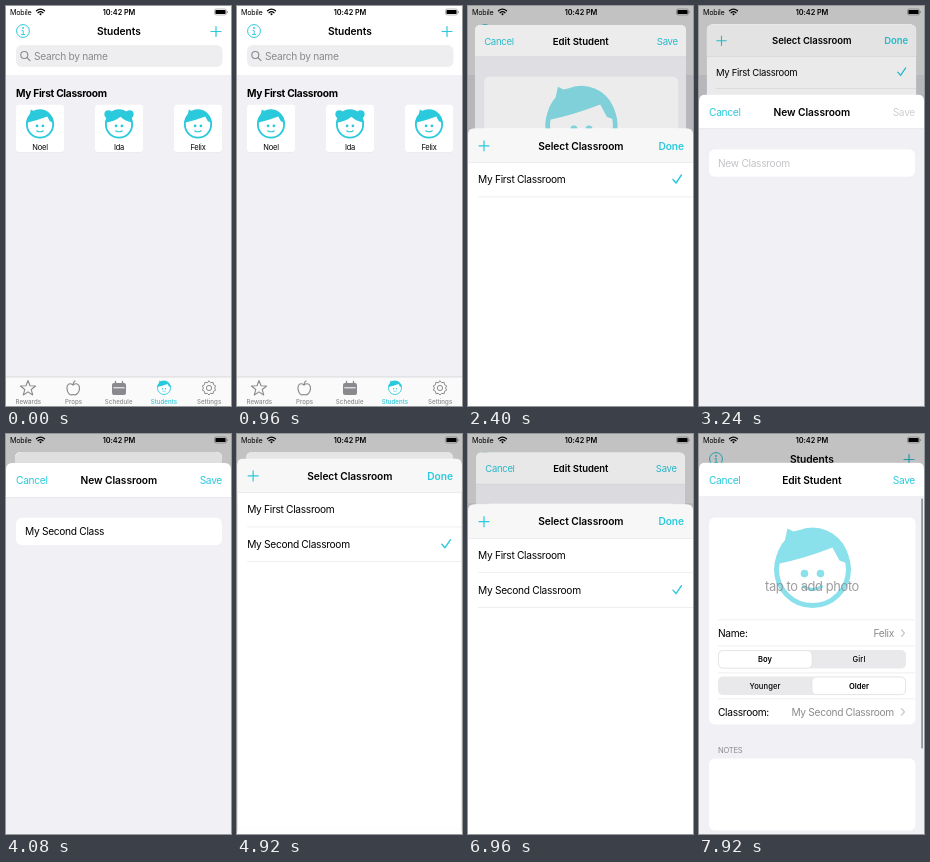
Recreate the animation shown at these times as an HTML page. Size 225x400 px, loop 8000 ms.

```html
<!DOCTYPE html>
<html lang="en">
<head>
<meta charset="utf-8">
<title>Classroom app</title>
<style>
  html, body { margin: 0; height: 100%; overflow: hidden; }
  svg { display: block; width: 100%; height: 100%; }
  text { font-family: Inter, "Liberation Sans", sans-serif; letter-spacing: -.03em; white-space: pre; }
  text[font-weight="600"] { letter-spacing: -.005em; }
  text[font-weight="500"] { letter-spacing: .01em; }
</style>
</head>
<body>
<svg id="stage" viewBox="0 0 225 400"></svg>
<script>
const LOOP = 8000, TOP = 29, SHEET_H = 371, TALL = 400;
const CYAN = '#2bc9dc', GRAY = '#8a8a8e', PAGE = '#f0f0f5', LINE = '#e3e3e6';
const EDIT_IN = 1458, SELECT_IN = 2254, NEW_IN = 3061, NEW_OUT = 4595, SELECT_OUT = 6930;
const TYPE_START = 3480, TYPE_STEP = 38, NEW_NAME = 'My Second Classroom';

// Markup helpers; text is placed by its vertical centre.
const text = (x, y, s, { size = 10.2, fill = '#000', weight = 400, anchor = 'start', id = '', extra = '' } = {}) =>
  `<text ${id && `id="${id}"`} x="${x}" y="${y}" dy=".36em" font-size="${size}" fill="${fill}" font-weight="${weight}" text-anchor="${anchor}" ${extra}>${s}</text>`;
const rect = (x, y, w, h, fill, r = 0, extra = '') =>
  `<rect x="${x}" y="${y}" width="${w}" height="${h}" rx="${r}" fill="${fill}" ${extra}/>`;
const stroke = (d, color = CYAN, width = 1, extra = '') =>
  `<path d="${d}" fill="none" stroke="${color}" stroke-width="${width}" stroke-linecap="round" stroke-linejoin="round" ${extra}/>`;
const hline = (y, x = 0, end = 225) => rect(x, y, end - x, .6, LINE);
const title = (y, s) => text(112.8, y, s, { weight: 600, anchor: 'middle' });
const plus = (x, y) => stroke(`M${x - 5} ${y}h10M${x} ${y - 5}v10`, CYAN, 1.2);
const check = (y, id) => stroke(`M205 ${y}l3 3.5l5.5 -8`, CYAN, 1.4, `id="${id}"`);
const chevron = y => stroke(`M202.5 ${y - 3.2}l3 3.2l-3 3.2`, '#c0c0c4', 1.1);

function face(x, y, scale, girl, extra = '') {
  const hair = girl
    ? '<circle cx="-29" cy="-28" r="11"/><circle cx="29" cy="-28" r="11"/><path d="M-37 -5A37 37 0 0 1 37 -5Q14 -10 4 -21Q-10 -9 -37 -5Z"/>'
    : '<path d="M-37 -5A37 37 0 0 1 37 -5L27 -9L20 -22Q-8 -11 -37 -5ZM-29 -23L-25 -41L-19 -38L-11 -40L-8 -34Z"/>';
  return `<g transform="translate(${x} ${y}) scale(${scale})" fill="${CYAN}" ${extra}>
    <circle r="36" fill="#fff" stroke="${CYAN}" stroke-width="5"/>${hair}
    <circle cx="-8" cy="4" r="3.8"/><circle cx="8" cy="4" r="3.8"/>
    ${stroke('M-9 17Q0 23 9 17', CYAN, 3)}</g>`;
}

const studentCard = (x, name, girl) =>
  rect(x, 99, 48, 47.5, '#000', 3, 'opacity=".04"') + rect(x, 98.7, 48, 47.3, '#fff', 3) +
  face(x + 24, 118.5, .365, girl) + text(x + 24, 141, name, { size: 7.5, anchor: 'middle' });

// A closed outline whose radius alternates around the centre: star or cog.
const burst = (x, y, points, outer, inner) => 'M' + Array.from({ length: points * 2 }, (_, i) => {
  const a = -Math.PI / 2 + i * Math.PI / points, r = i % 2 ? inner : outer;
  return `${(x + r * Math.cos(a)).toFixed(2)} ${(y + r * Math.sin(a)).toFixed(2)}`;
}).join('L') + 'Z';

function tabBar() {
  const icons =
    stroke(burst(22, 382.5, 5, 8, 3.4), GRAY, 1.1) +
    stroke('M67 379C63 376 60.5 379 61 383C61.5 387 64 390 67 388.5C70 390 73 387 73.5 383C74 379 71 376 67 379Q67 376 69 375', GRAY, 1.2) +
    rect(106, 377, 14, 12, GRAY, 2) + rect(107.3, 381.3, 11.4, 1, '#fff') +
    stroke('M109.5 375.5v3M116.5 375.5v3', GRAY, 1.4) +
    face(158, 382, .18, false) +
    stroke(burst(203, 382, 10, 7, 5.6), GRAY, 1) + `<circle cx="203" cy="382" r="2.6" fill="none" stroke="${GRAY}"/>`;
  const labels = ['Rewards', 'Props', 'Schedule', 'Students', 'Settings'].map((s, i) =>
    text(22.3 + 45.2 * i, 395.5, s, { size: 6.1, weight: 500, anchor: 'middle', fill: i === 3 ? CYAN : GRAY }));
  return rect(0, 371, 225, 29, '#fafafa') + rect(0, 370.7, 225, .6, '#c8c8cb') + icons + labels.join('');
}

const home = () =>
  rect(0, 0, 225, 400, PAGE) + rect(0, 0, 225, 69, '#fff') +
  `<circle cx="17" cy="25" r="6.4" fill="none" stroke="${CYAN}"/><circle cx="17" cy="22" r=".9" fill="${CYAN}"/>` +
  stroke('M16 24.5h1.2v4M15.5 28.5h3.2', CYAN, .9) +
  title(25.3, 'Students') + plus(210, 25.5) +
  rect(10, 39, 206.5, 22, '#eeeef0', 6) +
  `<circle cx="18.3" cy="49" r="3.5" fill="none" stroke="${GRAY}" stroke-width="1.1"/>` + stroke('M21 51.7l3 3', GRAY, 1.2) +
  text(28, 50, 'Search by name', { fill: GRAY }) +
  text(10, 87.5, 'My First Classroom', { weight: 700 }) +
  studentCard(10, 'Noel') + studentCard(89, 'Ida', true) + studentCard(168, 'Felix') + tabBar();

const statusBar = () =>
  text(4, 6.2, 'Mobile', { size: 7.2 }) +
  stroke('M30.5 4.8Q34.5 1.5 38.5 4.8M32 6.7Q34.5 4.7 37 6.7', '#000', 1.3) + '<circle cx="34.5" cy="8.3" r="1"/>' +
  text(113, 6.2, '10:42 PM', { size: 7.3, weight: 600, anchor: 'middle' }) +
  rect(208.5, 3, 12, 6, 'none', 1.6, 'stroke="#000" stroke-width=".5" stroke-opacity=".5"') +
  rect(209.4, 3.9, 10.2, 4.2, '#000', .9) + rect(221, 5, .9, 2, '#777', .4);

const header = (left, name, right, fill) =>
  rect(0, 0, 225, 34, fill) + hline(34) + left + title(17.6, name) + right;
const button = (s, x, anchor, opts) => text(x, 17.6, s, { fill: CYAN, anchor, ...opts });

const segmented = (y, left, right, selected) =>
  rect(19, y, 188, 18.5, '#e9e9eb', 5) +
  rect(19.5 + 93.5 * selected, y + .5, 93.5, 17.5, '#fff', 4.5, 'stroke="#d8d8db" stroke-width=".5"') +
  [left, right].map((s, i) => text(66 + 94 * i, y + 9.3, s, { size: 7.6, weight: i === selected ? 600 : 500, anchor: 'middle' })).join('');

const editSheet = () =>
  rect(0, 0, 225, TALL, PAGE) +
  header(button('Cancel', 10), 'Edit Student', button('Save', 216, 'end'), '#fff') +
  rect(10, 55, 206.5, 207, '#fff', 6) + face(113.5, 107, 1, false, 'opacity=".55"') +
  text(113, 124, 'tap to add photo', { size: 12.9, fill: '#8c8c90', anchor: 'middle', extra: 'opacity=".85"' }) +
  [157, 183, 210, 236].map(y => hline(y, 19, 216)).join('') +
  text(19, 170.5, 'Name:') + text(195, 170.5, 'Felix', { fill: GRAY, anchor: 'end' }) + chevron(170.5) +
  segmented(187.5, 'Boy', 'Girl', 0) + segmented(214, 'Younger', 'Older', 1) +
  text(19, 249.3, 'Classroom:') + text(195, 249.3, '', { fill: GRAY, anchor: 'end', id: 'classroom' }) + chevron(249.3) +
  text(19, 287.3, 'NOTES', { size: 7.6, fill: GRAY }) + rect(10, 296, 206.5, 72, '#fff', 6) +
  rect(222.2, 36, 1.8, 250, '#96969b', .9, 'id="scrollbar"');

const selectSheet = () =>
  rect(0, 0, 225, TALL, '#fff') +
  header(plus(16, 17.5), 'Select Classroom', button('Done', 216, 'end', { weight: 600 }), '#f7f7f7') +
  text(10, 51.2, 'My First Classroom') + check(51.2, 'check1') + hline(68.3, 10) +
  `<g id="secondRow">${text(10, 86, NEW_NAME)}${check(86, 'check2')}${hline(103, 10)}</g>`;

const newSheet = () =>
  rect(0, 0, 225, TALL, PAGE) +
  header(button('Cancel', 10), 'New Classroom', button('Save', 216, 'end', { id: 'saveNew' }), '#fff') +
  rect(10, 54.8, 206, 27.5, '#fff', 6) + text(19, 68.8, '', { id: 'field' });

const $ = id => document.getElementById(id);
const sheets = [
  { id: 'edit', draw: editSheet, start: EDIT_IN, end: Infinity },
  { id: 'select', draw: selectSheet, start: SELECT_IN, end: SELECT_OUT },
  { id: 'new', draw: newSheet, start: NEW_IN, end: NEW_OUT },
];

$('stage').innerHTML =
  `<clipPath id="card"><path d="M0 ${TALL}V7Q0 0 7 0H218Q225 0 225 7V${TALL}Z"/></clipPath>` +
  home() + rect(0, 0, 225, 400, '#000', 0, 'id="homeShade"') +
  sheets.map(s => `<g id="${s.id}" clip-path="url(#card)">${s.draw()}${rect(0, 0, 225, TALL, '#000', 0, `id="${s.id}Shade"`)}</g>`).join('') +
  statusBar();

// Critically damped spring from 0 to 1.
function spring(ms) {
  const x = Math.max(0, ms) * .01826;
  return x > 60 ? 1 : 1 - (1 + x) * Math.exp(-x);
}
const shown = (s, t) => s ? Math.max(0, spring(t - s.start) - spring(t - s.end)) : 0;
const show = (id, on) => $(id).setAttribute('opacity', Number(on));

function render(t) {
  show('homeShade', .24 * shown(sheets[0], t));
  sheets.forEach((s, i) => {
    // A covered sheet shrinks with the cover but rises ahead of it.
    const covered = shown(sheets[i + 1], t);
    const inset = 9 * covered, lift = 11 * covered ** .22;
    const y = TOP + SHEET_H * (1 - shown(s, t)) - lift;
    $(s.id).setAttribute('transform', `translate(${inset} ${y}) scale(${1 - 2 * inset / 225})`);
    show(s.id + 'Shade', .1 * covered);
  });

  const typed = NEW_NAME.slice(0, Math.max(0, Math.floor((t - TYPE_START) / TYPE_STEP)));
  $('field').textContent = typed || 'New Classroom';
  $('field').setAttribute('fill', typed ? '#000' : '#c4c4c8');
  $('saveNew').setAttribute('fill', typed ? CYAN : '#d0d0d3');

  const added = t >= NEW_OUT;
  show('check1', !added);
  show('secondRow', added);
  $('classroom').textContent = t >= SELECT_OUT ? NEW_NAME : 'My First Classroom';
  show('scrollbar', Math.min(1, Math.max(0, (t - 7500) / 100)));
}

const began = performance.now();
(function tick() {
  render((performance.now() - began) % LOOP);
  requestAnimationFrame(tick);
})();
</script>
</body>
</html>
```
